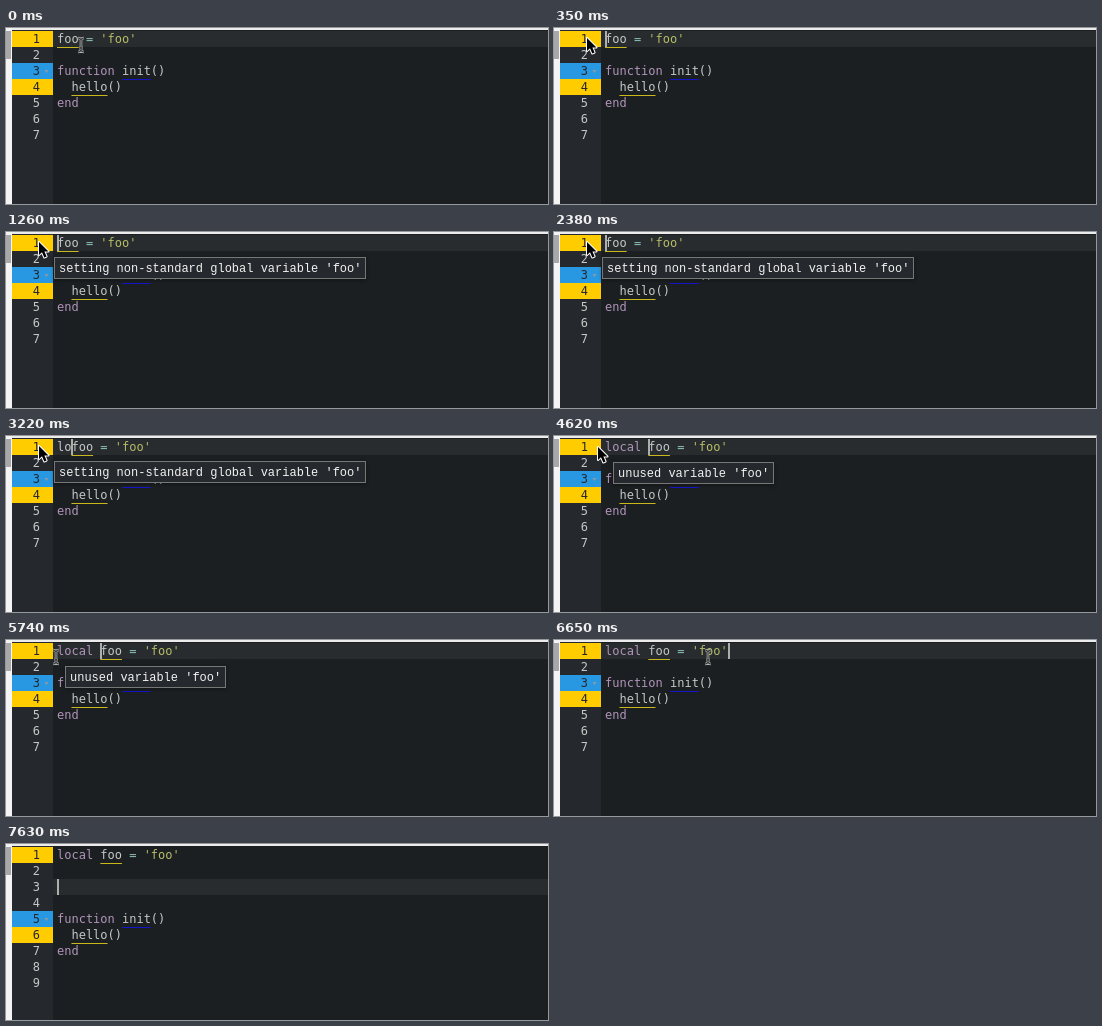
Recreate the animation shown at these times as an HTML page with a canvas. Size 542x176 px, loop 8 s.

```html
<!DOCTYPE html>
<html lang="en">
<head>
<meta charset="utf-8">
<style>
  html, body { margin: 0; overflow: hidden; background: #1b1f21; }
  canvas { display: block; }
</style>
</head>
<body>
<canvas width="542" height="176"></canvas>
<script>
const ctx = document.querySelector('canvas').getContext('2d');
const LOOP = 8000, STEP = 70;
const TOP = 3, ROW = 16, LEFT = 51, CHAR = 7.22;
const CODE_FONT = '12px "DejaVu Sans Mono", monospace';
const TIP_FONT = '12px "Liberation Mono", monospace';
const TEXT = '#c5c8c6', KEYWORD = '#b294bb', STRING = '#b5bd68', OPERATOR = '#8abeb7';
const YELLOW = '#ffcc00', BLUE = '#2998e2', WARNING = '#c9b81c', INFO = '#1414c8';

const mousePath = [
  [0, 75, 17], [350, 33, 10], [4060, 33, 10], [4270, 58, 15], [4340, 58, 15],
  [4550, 44, 11], [5600, 44, 11], [5740, 50, 17], [6020, 50, 17],
  [6230, 140, 44], [6370, 140, 44], [6650, 154, 17]
];
const MOUSE_HIDDEN = 7000;
// Alternating on and off times of the caret.
const blinks = [350, 840, 1260, 1750, 2310, 2870, 3080, 4060, 4550, 5040, 5530, 6020, 6510, 7140, 7630];
const tips = [
  { from: 420, to: 4130, x: 48, y: 25, text: "setting non-standard global variable 'foo'" },
  { from: 4550, to: 5880, x: 59, y: 26, text: "unused variable 'foo'" }
];

function rect(color, x, y, w, h) {
  ctx.fillStyle = color;
  ctx.fillRect(x, y, w, h);
}

function write(text, x, y, color) {
  ctx.fillStyle = color;
  ctx.fillText(text, x, y);
}

const rowY = row => TOP + (row - 1) * ROW;

// Draws [text, color, underline] tokens one after another.
function codeLine(row, tokens) {
  let x = LEFT;
  for (const [text, color, underline] of tokens) {
    const width = text.length * CHAR;
    write(text, x, rowY(row) + 12, color);
    if (underline) rect(underline, x, rowY(row) + 16, width, 1);
    x += width;
  }
}

function gutter(added) {
  rect('#25282c', 6, 2, 41, 174);
  const marks = { 1: YELLOW, [3 + added]: BLUE, [4 + added]: YELLOW };
  for (let row = 1; row <= 7 + added; row++) {
    const y = rowY(row);
    if (marks[row]) rect(marks[row], 6, y, 41, ROW);
    write(row, 34 - CHAR, y + 12, marks[row] ? '#25282c' : TEXT);
  }
  const y = rowY(3 + added) + 7;
  ctx.fillStyle = '#8a9aa5';
  ctx.fill(new Path2D(`M38.5 ${y}h4l-2 3z`));
}

function tooltip({ x, y, text }) {
  const width = Math.round(text.length * 7.2) + 10;
  ctx.save();
  ctx.shadowColor = 'rgba(0,0,0,.4)';
  ctx.shadowBlur = 4;
  ctx.shadowOffsetY = 1;
  rect('#25282c', x, y, width, 22);
  ctx.restore();
  ctx.strokeStyle = '#777';
  ctx.lineWidth = 1;
  ctx.strokeRect(x + .5, y + .5, width - 1, 21);
  ctx.font = TIP_FONT;
  write(text, x + 5, y + 15, '#f2f2f2');
}

function mouseAt(t) {
  const next = mousePath.findIndex(p => p[0] > t);
  if (next < 0) return mousePath.at(-1).slice(1);
  const [t0, x0, y0] = mousePath[next - 1], [t1, x1, y1] = mousePath[next];
  const k = (t - t0) / (t1 - t0), ease = k * k * (3 - 2 * k);
  return [x0 + (x1 - x0) * ease, y0 + (y1 - y0) * ease];
}

function strokePath(path, color, width) {
  ctx.strokeStyle = color;
  ctx.lineWidth = width;
  ctx.stroke(path);
}

function pointer(x, y) {
  ctx.save();
  ctx.translate(x, y);
  ctx.lineJoin = 'round';
  if (x < 47) {
    const arrow = new Path2D('M0 0V13L3 10.3L5.3 15.5L7.6 14.5L5.4 9.5H9.5Z');
    strokePath(arrow, '#fff', 2);
    ctx.fillStyle = '#000';
    ctx.fill(arrow);
  } else {
    const beam = new Path2D('M-3 -7Q0 -7 0 -5V5Q0 7 -3 7M3 -7Q0 -7 0 -5M0 5Q0 7 3 7M-2 3H2');
    strokePath(beam, '#b4b6b6', 2.6);
    strokePath(beam, '#222', 1);
  }
  ctx.restore();
}

function draw(time) {
  const t = Math.floor(time / STEP) * STEP;
  const typed = 'local '.slice(0, t < 3080 ? 0 : Math.floor((t - 3080) / 84) + 1);
  const added = t < 7000 ? 0 : t < 7210 ? 1 : 2;
  const caretRow = 1 + added;
  const caretColumn = added ? 0 : t < 6510 ? typed.length : 17;

  ctx.font = CODE_FONT;
  rect('#1b1f21', 0, 0, 542, 176);
  rect('#282c2e', 47, rowY(caretRow), 495, ROW);
  gutter(added);
  rect('#ececec', 0, 0, 542, 2);
  rect('#f4f4f4', 0, 0, 6, 176);
  rect('#a8a8a8', 0, 3, 5, 28);

  codeLine(1, [
    [typed, typed.length > 4 ? KEYWORD : TEXT], ['foo', TEXT, WARNING],
    [' = ', OPERATOR], ["'foo'", STRING]
  ]);
  codeLine(3 + added, [['function ', KEYWORD], ['init', TEXT, INFO], ['()', TEXT]]);
  codeLine(4 + added, [['  ', TEXT], ['hello', TEXT, WARNING], ['()', TEXT]]);
  codeLine(5 + added, [['end', KEYWORD]]);

  const caretOn = blinks.filter(b => b <= t).length % 2 === 1;
  if (caretOn) rect('#aeafad', Math.round(LEFT + caretColumn * CHAR), rowY(caretRow), 2, ROW);

  tips.filter(tip => t >= tip.from && t < tip.to).forEach(tooltip);
  if (t < MOUSE_HIDDEN) pointer(...mouseAt(t));
}

function tick() {
  draw(performance.now() % LOOP);
  requestAnimationFrame(tick);
}
tick();
</script>
</body>
</html>
```
